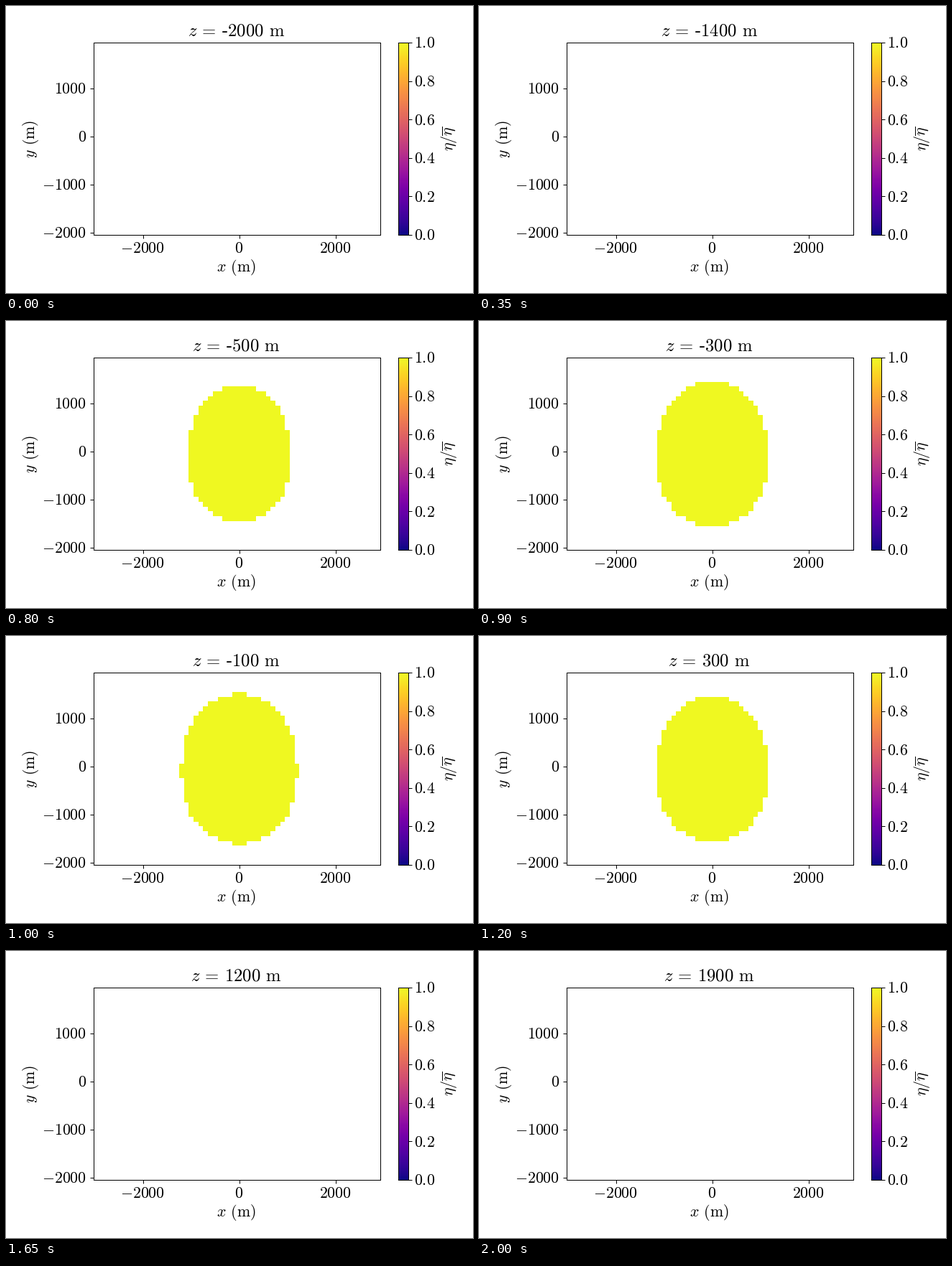
These frames come from a looping animation (650x400 px, 2050 ms). A matplotlib script:

```python
import numpy as np
import matplotlib.pyplot as plt
from matplotlib.animation import FuncAnimation

W, H = 650, 400
LEFT, RIGHT, TOP, BOTTOM = 122, 521, 51, 319
XLIM, YLIM = (-3025, 2930), (-2050, 1950)

plt.rcParams["mathtext.fontset"] = "cm"
fig = plt.figure(figsize=(W / 100, H / 100), dpi=100, facecolor="white")


def panel(x0, y0, x1, y1):
    ax = fig.add_axes([x0 / W, 1 - y1 / H, (x1 - x0) / W, (y1 - y0) / H])
    for spine in ax.spines.values():
        spine.set_linewidth(0.72)
    ax.tick_params(length=3.5, width=0.72, labelbottom=False,
                   labelleft=False, labelright=False)
    return ax


def put(x, y, text, ha="center", size=15.8, **kw):
    return fig.text(x / W, 1 - y / H, text, ha=ha, va="baseline",
                    size=size, rotation_mode="anchor", **kw)


def title_text(z):
    sign = r"\text{-}" if z < 0 else ""
    gap = r"\hspace{0.38}"
    return rf"$z{gap}\text{{=}}{gap}{sign}{abs(z)}{gap}\mathrm{{m}}$"


# Cross-section of the body: an egg-like superellipse that changes with z
xs = np.arange(-3000, 2901, 100)
ys = np.arange(-2000, 1901, 100)
X, Y = np.meshgrid(xs, ys)
LEVEL = [-1.01, -0.81, -0.25, -0.01, 0.09, 0.49, 1.04]   # z|z| in km^2
HALF_X = [0, 552, 1075, 1206, 1170, 890, 0]
HALF_Y = [686, 935, 1415, 1560, 1510, 1252, 766]
POWER = 2.13


def section(z):
    level = z * abs(z) / 1e6
    a, b = (np.sqrt(np.interp(level, LEVEL, np.square(r)))
            for r in (HALF_X, HALF_Y))
    if a < 1:
        return np.ma.masked_all(X.shape)
    u = np.abs(X) / a
    skew = (z / 900) ** 4
    mid = -50 - 20 * skew - (40 + 90 * skew) * u ** 2
    half = b * np.clip(1 - u ** POWER, 0, 1) ** (1 / POWER)
    inside = (u < 1) & (np.abs(Y - mid) <= half)
    return np.ma.masked_where(~inside, np.ones(X.shape))


ax = panel(LEFT, TOP, RIGHT, BOTTOM)
image = ax.imshow(section(-2000), extent=(-3050, 2950, -2050, 1950),
                  origin="lower", aspect="auto", cmap="plasma",
                  vmin=0, vmax=1, interpolation="nearest")
ax.set(xlim=XLIM, ylim=YLIM, xticks=[-2000, 0, 2000],
       yticks=[-2000, -1000, 0, 1000])
for v in (-2000, 0, 2000):
    px = LEFT + (v - XLIM[0]) / (XLIM[1] - XLIM[0]) * (RIGHT - LEFT)
    put(px - 0.3, 344.5, f"${v}$")
for v in (-2000, -1000, 0, 1000):
    py = BOTTOM - (v - YLIM[0]) / (YLIM[1] - YLIM[0]) * (BOTTOM - TOP)
    put(112, py + 7.5, f"${v}$", ha="right")

bar = panel(546, TOP, 560, BOTTOM)
bar.imshow(np.linspace(0, 1, 256)[:, None], extent=(0, 1, 0, 1),
           origin="lower", aspect="auto", cmap="plasma")
bar.yaxis.tick_right()
bar.tick_params(labelright=False)
bar.set(xticks=[], yticks=np.linspace(0, 1, 6))
for v in np.linspace(0, 1, 6):
    put(568.3, BOTTOM - v * (BOTTOM - TOP) + 7.5, f"${v:.1f}$", ha="left")

put(320.5, 370, r"$x\hspace{0.38}\text{(m)}$")
put(40, 185.5, r"$y\hspace{0.38}\text{(m)}$", rotation=90)
put(621.5, 185, r"$\eta/\overline{\eta}$", rotation=90)
title = put(320.5, 42, title_text(-2000), size=17.8)


def update(i):
    z = -2000 + 100 * max(i - 1, 0)
    image.set_data(section(z))
    title.set_text(title_text(z))
    return image, title


anim = FuncAnimation(fig, update, frames=41, interval=50,
                     repeat=True, repeat_delay=0)
plt.show()
```
